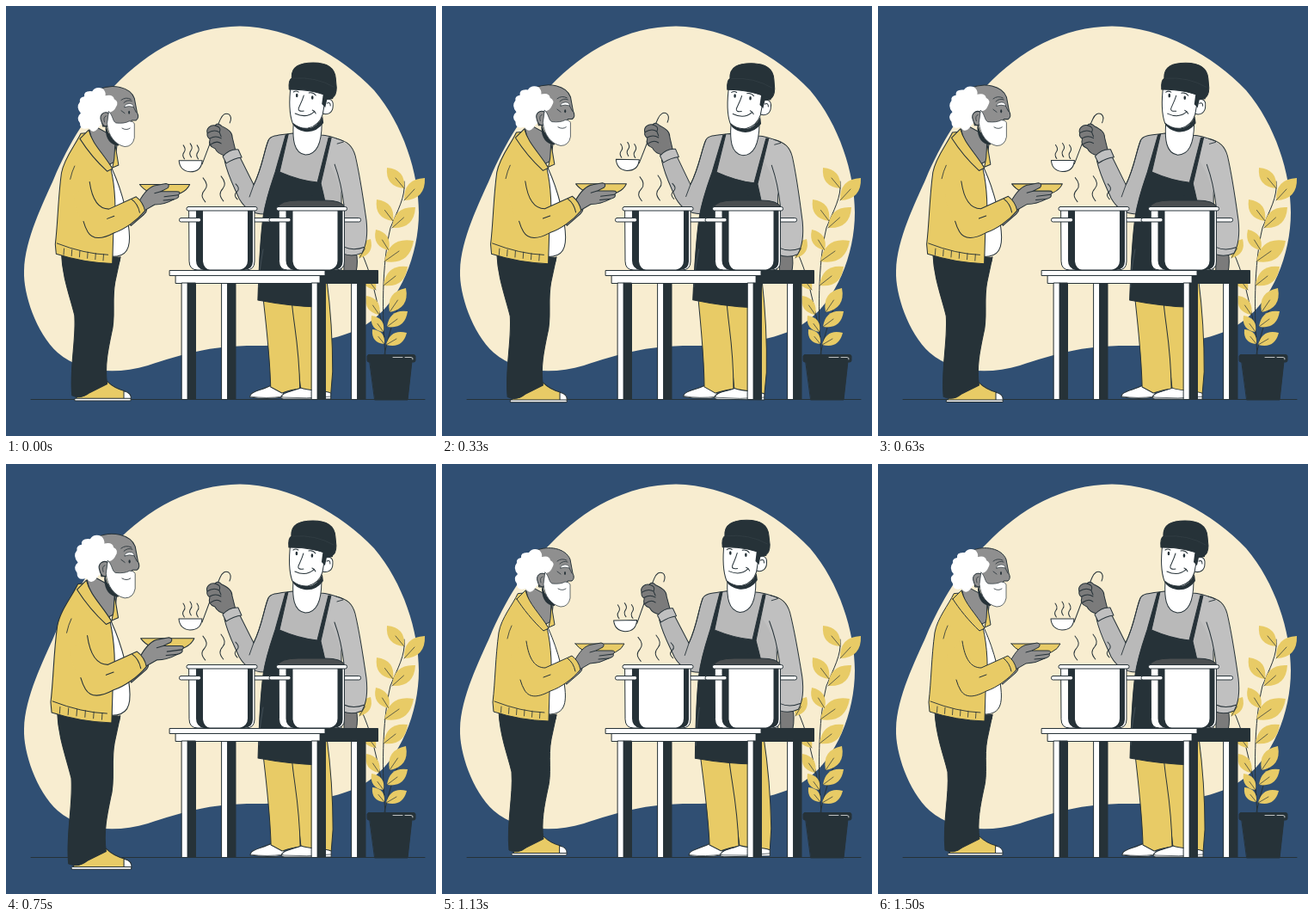
Recreate the animation shown at these times as an HTML page with a canvas. Size 500x500 px, loop 1540 ms.

```html
<!DOCTYPE html>
<html lang="en">
<head>
<meta charset="utf-8">
<title>Soup kitchen</title>
<style>
html, body { margin: 0; width: 100%; height: 100%; overflow: hidden; background: #304f73; }
canvas { display: block; width: 500px; height: 500px; }
</style>
</head>
<body>
<canvas id="stage"></canvas>
<script>
const LOOP = 1540;
const BLUE = '#304f73', CREAM = '#f8edd0', YELLOW = '#e8cb66', DARK = '#263238';
const WHITE = '#fff', SKIN = '#8f8f8f', HAND = '#7b7b7b', SHIRT = '#b9b9b9', SLEEVE = '#c0c0c0';

const canvas = document.getElementById('stage');
const ctx = canvas.getContext('2d');
const ratio = window.devicePixelRatio || 1;
canvas.width = canvas.height = 500 * ratio;

function shape(fill, d, width = 1) {
  const path = new Path2D(d);
  ctx.fillStyle = fill;
  ctx.fill(path);
  if (width) strokePath(path, width);
}

function strokePath(path, width, color = DARK) {
  ctx.lineWidth = width;
  ctx.strokeStyle = color;
  ctx.stroke(path);
}

function line(d, width = 1, color = DARK) {
  strokePath(new Path2D(d), width, color);
}

function box(fill, x, y, w, h, r = 0) {
  const path = new Path2D();
  path.roundRect(x, y, w, h, r);
  ctx.fillStyle = fill;
  ctx.fill(path);
  strokePath(path, 1);
}

function dot(x, y, rx, ry, fill = DARK) {
  ctx.fillStyle = fill;
  ctx.beginPath();
  ctx.ellipse(x, y, rx, ry, 0, 0, Math.PI * 2);
  ctx.fill();
}

function steam(x, y, h, bend) {
  const step = h / 3;
  line(`M${x} ${y}c${bend} ${step * .5} ${bend * 1.6} ${step} ${bend * .5} ${step * 1.5}s${-bend} ${step * .9} ${bend * .2} ${step * 1.5}`);
}

function leaf(tx, ty, bx, by, belly = .5) {
  const dx = tx - bx, dy = ty - by;
  const side = s => [bx + dx * .5 - dy * belly * s, by + dy * .5 + dx * belly * s].join(' ');
  shape(YELLOW, `M${bx} ${by}Q${side(1)} ${tx} ${ty}Q${side(-1)} ${bx} ${by}Z`, 0);
  line(`M${bx} ${by}L${bx + dx * .5} ${by + dy * .5}`, .7);
}

function backdrop() {
  ctx.fillStyle = BLUE;
  ctx.fillRect(0, 0, 500, 500);
  shape(CREAM, 'M272 23.5C330 24 390 58 428 98C462 138 480 195 480 240C480 290 458 342 425 366C398 387 350 395 290 395C235 395 205 405 165 418C125 430 85 425 60 403C35 380 20 335 21 308C22 270 44 228 56 200C72 162 98 118 126 93C165 52 215 24 272 23.5Z', 0);
  line('M29 457.5H487');
}

function plant() {
  line('M441 405C437 360 437 300 447 258C455 238 465 222 463 204');
  line('M440 385C432 345 425 310 412 284');
  line('M440 405C446 378 452 360 458 345');
  leaf(443, 188, 463, 212);
  leaf(487, 200, 463, 226);
  leaf(431, 225, 450, 250);
  leaf(476, 234, 449, 258);
  leaf(430, 260, 445, 284);
  leaf(474, 273, 440, 297);
  leaf(424, 271, 411, 293);
  leaf(414, 309, 430, 330);
  leaf(467, 303, 439, 325);
  leaf(419, 337, 434, 359);
  leaf(465, 328, 446, 356);
  leaf(467, 355, 443, 373);
  leaf(425, 360, 439, 379);
  leaf(426, 376, 440, 393);
  leaf(466, 380, 442, 394);
  shape(DARK, 'M423 413H472L467 458H429Z');
  box(DARK, 420, 405.5, 56, 8.5, 2);
  line('M450 408.5H461M464 408.5H471Q474 409 473 411', .7, WHITE);
}

function chef() {
  // shoes and trousers
  shape(WHITE, 'M284 455C283 448 298 447 309 441L323 446V455Q304 458 284 455Z');
  shape(YELLOW, 'M331 340L373 318C378 355 380 390 380 425L378 451L343 446Z');
  shape(YELLOW, 'M299 338H332C334 370 341 390 342 445C332 446 324 449 321 450L308 443C307 405 303 375 299 338Z');
  shape(WHITE, 'M320 455C321 449 334 448 343 444C354 448 368 446 378 450V457H325Q320 457 320 455Z');
  line('M284 454Q303 457 322 454M321 455Q350 457 378 454', .7);

  // hanging arm and torso
  shape(HAND, 'M393 286H407Q410 296 407 310H393Z');
  shape(SHIRT, 'M333 148C318 150 308 150 305 156C300 168 298 187 288 208L271 174L254 180C258 198 265 210 271 224C278 236 288 242 300 242V310H390V188L392 157Q375 150 366 150Z');
  shape(SLEEVE, 'M377 153C393 156 402 162 405 172C411 195 416 228 419 249C421 267 418 280 414 287Q403 292 392 288V225C388 208 382 192 374 181Z', 0);
  line('M384 154C397 157 403 163 406 174C411 195 416 228 419 249C421 267 418 280 414 287Q403 292 392 288M382 184Q390 206 393 232M393 280Q404 285 417 280');
  line('M305 156C300 168 298 187 288 208L283 222M385 160L392 158', .9);

  // apron
  shape(DARK, 'M325 150L328 149L318 193Q341 203 362 205L375 153L378 153L366 206C369 220 374 236 374 250L370 311L364 350Q330 349 293 342C294 310 295 275 299 245C302 225 308 208 313 193Z');
  line('M299 283Q294 311 294 327', .6, '#53606a');

  // neck and head
  shape(WHITE, 'M334 137C333 154 334 171 348 173C361 173 367 161 367 136Z');
  shape(DARK, 'M333 134Q340 143 352 142Q362 141 368 128L369 136Q360 148 347 146Q337 144 333 137Z', 0);
  shape(WHITE, 'M368 110C374 106 381 108 380 116C380 124 374 127 368 125Z');
  shape(WHITE, 'M331 92C329 108 329 125 333 136Q341 143 351 142Q364 139 368 126L372 103Z');
  shape(DARK, 'M369 99L367 114L371 118L373 109L380 108V98Z', 0);
  shape(DARK, 'M332 84C331 70 342 66 357 66C374 66 382 72 383 84L384 95Q384 104 379 107C364 99 347 97 329 97Q328 86 332 84Z');
  line('M334 84Q360 82 381 94', .5, '#3b474d');
  dot(338, 104, 1.3, 2.3);
  dot(356, 106.5, 1.3, 2.3);
  line('M334 100Q337 98 340 100M352 101Q357 100 360 104');
  line('M346 104C344 111 341 116 340 119Q339 123 346 122M336 125Q349 131 358 123M356 121Q359 122 360 125M373 113Q377 111 377 116');

  // ladle, fist and cuff
  line('M228 184L237 160L249 132Q253 123 259 126Q263 129 260 136');
  shape(WHITE, 'M201 180H228Q227 193 214 193Q202 192 201 180Z');
  shape(HAND, 'M234 148C232 142 238 138 243 139Q246 135 251 140C259 144 263 147 263 153L267 169L255 174C249 173 245 170 243 166C235 163 236 158 237 155Q233 152 234 148Z');
  line('M234 148Q242 143 248 147L250 152M237 154Q244 150 250 154M238 161Q245 156 250 160M248 147Q251 141 243 139');
  shape(SLEEVE, 'M252 175Q260 166 270 167L274 176Q265 177 256 183Z');

  [206, 214, 222].forEach((x, i) => steam(x, i === 1 ? 160 : 162, 16, 2));
  steam(229, 200, 28, 4);
  steam(250, 198, 29, 4);
  steam(267, 207, 18, 3);
}

function tableLeg(x) {
  box(WHITE, x, 322, 7, 135.5);
  box(DARK, x + 7, 322, 9, 135.5);
}

function table() {
  [251, 402].forEach(tableLeg);
  box(WHITE, 197.5, 313.5, 168, 9);
  box(DARK, 365.5, 307.5, 67, 15);
  [204.5, 355.5].forEach(tableLeg);
  box(WHITE, 190.5, 307.5, 180.5, 6);
}

function pot(x) {
  ctx.save();
  ctx.translate(x, 0);
  box(WHITE, 75, 246.5, 23, 4.5, 2);
  shape(WHITE, 'M3 237H79V297Q79 307 69 307H13Q3 307 3 297Z');
  shape(DARK, 'M11 238H19V297Q20 305 27 307H20Q11 305 11 296Z', 0);
  shape(DARK, 'M71 238H77V297Q77 306 67 307H62Q71 304 71 296Z', 0);
  box(WHITE, -8.5, 246.5, 25, 4.5, 2);
  box(WHITE, 0, 233.5, 82, 4.5, 2);
  ctx.restore();
}

function pots() {
  pot(210);
  shape(DARK, 'M354 227V222Q356 219 358 222V227Z');
  shape('#4b4f51', 'M316 234Q319 226 340 226H371Q391 226 394 234Z');
  pot(314.5);
}

function elder() {
  // shoes and trousers
  shape(YELLOW, 'M82 453L91 443L118 433Q126 441 138 444V453Z');
  shape(WHITE, 'M137 444Q146 446 145 453H137Z');
  box(WHITE, 81, 452.5, 64, 2.5, 1);
  shape(DARK, 'M66 287C67 315 76 337 81 358C83 385 75 418 78 449Q88 454 98 446L118 436C115 416 119 397 123 378C128 360 123 341 127 320L133 292Z');

  // shirt, jacket and far hand
  shape(WHITE, 'M120 184C131 205 141 237 143 262C145 282 140 291 124 291Z');
  shape(SKIN, 'M142 250L160 234Q166 237 160 243L145 256Z');
  shape(YELLOW, 'M88 151C82 164 69 179 66 196C62 225 62 252 59 277L60 288Q91 298 124 299L125 265C129 240 127 211 122 190L100 150Z');
  line('M61 276Q92 288 119 289', .9);
  for (let i = 0; i < 6; i++) line(`M${69 + i * 9} ${282 + i * 1.3}l-.5 7`, .8);
  line('M133 291L132 297L124 299M81 188Q78 194 76 203', .8);

  // neck and collar
  shape(SKIN, 'M99 140L130 157L127 183L119 187C109 174 101 163 98 148Z');
  shape(DARK, 'M117 137C117 149 122 158 132 161L131 165Q117 164 116 146Z', 0);
  shape(YELLOW, 'M87 157L97 147C101 163 114 174 124 191L118 194C106 183 94 168 87 157Z');
  shape(YELLOW, 'M127 163L131 187L124 190L126 180Z');

  // head
  shape(SKIN, 'M108 101C124 94 144 98 149 111L152 127Q155 133 151 136H146L143 143H113Z');
  shape(WHITE, 'M113 100Q117 104 116 108Q125 106 126 112Q132 115 128 121Q126 126 121 127L119 140C113 137 110 142 107 146Q102 152 97 145Q87 148 87 139Q82 133 88 128Q82 121 87 115Q86 110 92 109Q91 102 101 103Q105 97 113 100Z', 0);
  shape(SKIN, 'M120 128C114 125 109 130 111 136Q113 145 119 142Z');
  line('M117 131Q113 132 115 138', .7);
  shape(WHITE, 'M120 126C125 131 124 137 128 139Q138 140 143 137Q148 137 149 140L149 156Q147 166 138 166C127 164 119 153 118 140Z', .7);
  shape(WHITE, 'M138 121Q137 118 143 117Q148 117 148 121Q143 119 138 121Z', .6);
  dot(143, 127, 1, 2);
  line('M134 113Q139 109 145 112M137 116Q141 112 146 114M134 125L138 128M148 121L151 127M135 145Q140 148 144 145', .8);

  // bowl, hand and near sleeve
  shape(YELLOW, 'M155 209H212Q206 222 183 222Q163 220 155 209Z');
  shape(SKIN, 'M154 229C160 218 166 211 174 210L185 208Q190 209 187 213L179 217L197 217Q203 217 199 221Q201 224 194 226Q183 232 172 232L160 239Z');
  line('M179 217L172 219M199 221L183 223M194 226L182 227');
  shape(YELLOW, 'M98 206C101 227 108 237 120 237L151 223Q159 229 161 239C152 250 138 260 126 264C113 271 102 273 96 263C91 252 80 238 80 221Z', 0);
  line('M98 206C101 227 108 237 120 237L151 223Q159 229 161 239C152 250 138 260 126 264C113 271 102 273 96 263Q93 258 91 251M146 226Q153 231 155 241M118 248L126 245');
}

function mix(time, stops) {
  const i = stops.findIndex(([at]) => at >= time);
  if (i < 1) return stops[0][1];
  const [t0, a] = stops[i - 1], [t1, b] = stops[i];
  return a + (b - a) * (time - t0) / (t1 - t0);
}

const PULSE = [[0, 1], [.1, 1.1], [.3, 1], [.4, 1], [.5, 1.1], [.6, 1], [1, 1]];
const SWAY = [[0, 0], [.25, 1], [.75, -1], [1, 0]];

function around(x, y, transform, paint) {
  ctx.save();
  ctx.translate(x, y);
  transform();
  ctx.translate(-x, -y);
  paint();
  ctx.restore();
}

function draw(now) {
  const phase = (now / LOOP + .022) % 1;
  const size = mix(phase, PULSE);
  const tilt = mix(phase, SWAY) * Math.PI / 180;

  ctx.setTransform(ratio, 0, 0, ratio, 0, 0);
  ctx.lineJoin = ctx.lineCap = 'round';
  backdrop();
  plant();
  around(311, 262, () => ctx.rotate(tilt), chef);
  table();
  pots();
  around(136, 277, () => ctx.scale(size, size), elder);
}

let start;
function tick(now) {
  start ??= now;
  draw(now - start);
  requestAnimationFrame(tick);
}
draw(0);
requestAnimationFrame(tick);
</script>
</body>
</html>
```
